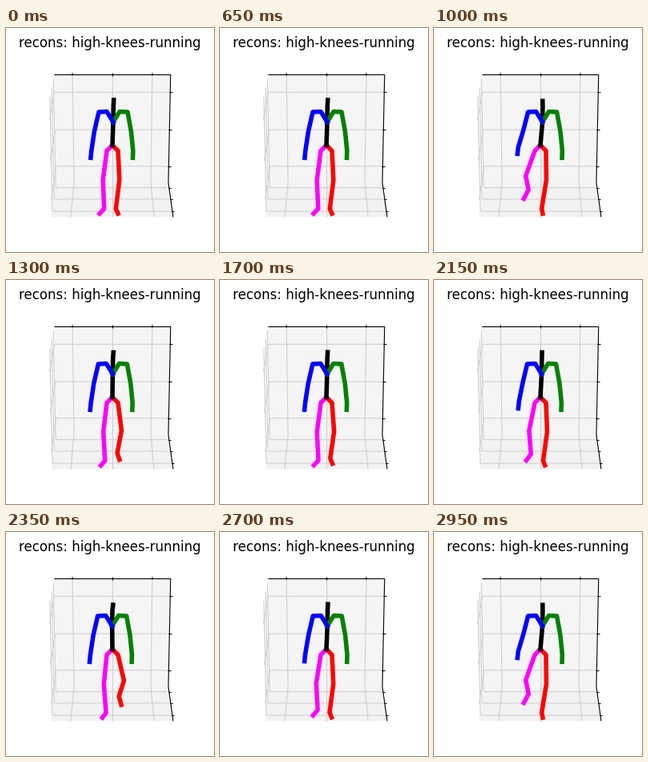
Recreate the animation shown at these times as a matplotlib script. Size 260x280 px, loop 3 s.

```python
import numpy as np
import matplotlib.pyplot as plt
from matplotlib.animation import FuncAnimation

W, H, DPI = 260, 280, 100
FRAMES, STEP = 60, 50

fig = plt.figure(figsize=(W / DPI, H / DPI), dpi=DPI, facecolor="white")
ax = fig.add_axes([0, 0, 1, 1])
ax.set_xlim(0, W)
ax.set_ylim(H - 0.5, -0.5)
ax.axis("off")
fig.text(129.5 / W, 1 - 24 / H, "recons: high-knees-running", fontsize=12,
         family="DejaVu Sans", ha="center", va="baseline")


# --- the room: a box seen in perspective, tilted 20 degrees ---
TILT = np.radians(20)
HALF = np.array([0.595, 0.595, 0.4465])
GRID = "#d0d0d0"


def project(points):
    x, y, z = (np.asarray(points, float) * HALF).T
    up = y * np.cos(TILT) - z * np.sin(TILT)
    depth = 10 - y * np.sin(TILT) - z * np.cos(TILT)
    return 133 + 1249 * x / depth, 145 - 1249 * up / depth


def pane(axis, shade):
    """Fill the wall on the low side of one axis."""
    corners = [(-1, -1), (1, -1), (1, 1), (-1, 1)]
    ax.fill(*project(np.insert(corners, axis, -1, axis=1)),
            color=str(shade), lw=0, zorder=0)


def edge(points, color="black", z=2):
    ax.plot(*project(points), color=color, lw=0.8, zorder=z,
            solid_capstyle="butt")


for axis, shade in enumerate((0.975, 0.95, 0.9625)):
    pane(axis, shade)

OUT, IN = 1.033, 0.984
for t in (-0.6857, 0, 0.6857):
    edge([(t, 1, -1), (t, -1, -1), (t, -1, 1)], GRID, 1)
    edge([(1, t, -1), (-1, t, -1), (-1, t, 1)], GRID, 1)
    edge([(1, -1, t), (-1, -1, t), (-1, 1, t)], GRID, 1)
    edge([(t, IN, -1), (t, OUT, -1)])
    edge([(IN, t, -1), (OUT, t, -1)])
    edge([(IN, -1, t), (OUT, -1, t)])
edge([(-1, 1, -1), (1, 1, -1), (1, -1, -1), (1, -1, 1)])

# --- the runner: bones as (outward, down) steps, mirrored left and right ---
PELVIS = np.array([133, 146])
SPINE = np.array([(0, 0), (1, -29), (1.3, -49), (1.7, -56.5)])
LEG = np.array([(7, 7), (3.3, 36.5), (-3, 36), (4.2, 6)])
KNEE_UP = np.array([(0, 0), (5, -4.8), (-3.3, -18), (-1, 5)])
ARM = np.array([(8, -13), (10, 0.5), (5, 24.3), (3, 24), (0.3, 9)])
ARM_UP = np.array([(0, 0), (0, 0), (0, -2.3), (3, -1.5), (0, -1)])

PERIOD, RISE = 955, 300
FIRST_LEFT, FIRST_RIGHT = 1015, 1470

lines = {c: ax.plot([], [], color=c, lw=4, zorder=3 + i,
                    solid_capstyle="projecting", solid_joinstyle="round")[0]
         for i, c in enumerate(("red", "magenta", "black", "green", "blue"))}


def lift(ms, first):
    """Smooth knee raise, once per stride, after standing still."""
    if ms < first - RISE:
        return 0
    gap = abs((ms - first + PERIOD / 2) % PERIOD - PERIOD / 2)
    return 1.05 * (1 + np.cos(np.pi * min(gap / RISE, 1))) / 2


def limb(root, bones, side, fixed, shift):
    """Chain mirrored bones; those past the fixed ones also lean sideways."""
    steps = bones * (side, 1)
    steps[fixed:, 0] += shift
    return np.vstack([root, root + np.cumsum(steps, axis=0)])


def draw(i):
    left, right = (lift(i * STEP, f) for f in (FIRST_LEFT, FIRST_RIGHT))
    sway = right - left

    spine = PELVIS + SPINE
    spine[1:, 0] -= sway * np.array([1.5, 1.5, 1])
    spine[2:, 1] += 1.2 * (left + right)
    chest = spine[1]
    lean = 1.3 * sway - 1.5

    poses = {
        "red": limb(PELVIS, LEG + right * KNEE_UP, 1, 1, lean),
        "magenta": limb(PELVIS, LEG + left * KNEE_UP, -1, 1, lean),
        "black": spine,
        "green": limb(chest, ARM, 1, 2, -0.6),
        "blue": limb(chest, ARM + left * ARM_UP, -1, 2, -0.6),
    }
    for color, points in poses.items():
        lines[color].set_data(*points.T)
    return list(lines.values())


anim = FuncAnimation(fig, draw, frames=FRAMES, interval=STEP, repeat=True,
                     repeat_delay=0, blit=False)
plt.show()
```
